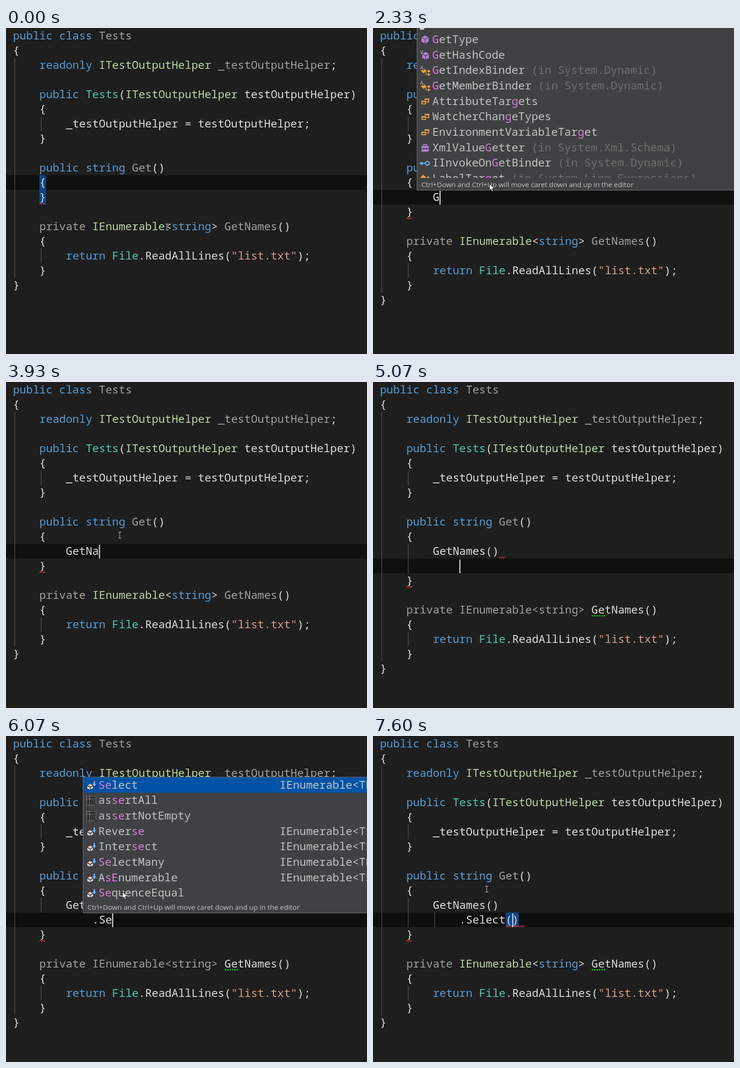
These frames come from a looping animation (787 px wide and 711 px high, 8 s). An HTML page with a canvas:

```html
<!DOCTYPE html>
<html lang="en">
<head>
<meta charset="utf-8">
<title>Code completion</title>
<style>
html, body { margin: 0; width: 100%; height: 100%; overflow: hidden; background: #1e1e1e; }
canvas { display: block; }
</style>
</head>
<body>
<canvas id="stage" width="787" height="711"></canvas>
<script>
const ctx = document.getElementById('stage').getContext('2d');
const W = 787, H = 711, LOOP = 8000;
const LEFT = 15.2, CHAR = 14.41, TOP = 1, LINE = 32, ROW = 33.65;
const MONO = '24px "Noto Sans Mono", monospace';
const BOLD = 'bold ' + MONO;
const sans = px => px + 'px "Open Sans", sans-serif';

// Colour keys used by the markup: each segment starts with its key
const INK = {
  k: '#569cd6', i: '#b8d7a3', c: '#4ec9b0', w: '#dcdcdc', g: '#a0a0a0', s: '#d69d85',
  t: '#c3c3c3', m: '#d57fd8', d: '#6e6e6e', v: '#cdbdf2', b: '#e6e6e6'
};
const PURPLE = '#b180d7', ORANGE = '#e8a24a', BLUE = '#6fbcff';
const PANEL = '#404143', BORDER = '#686868', DARK = '#2a2a2b';

const colX = col => LEFT + col * CHAR;
const rowY = row => TOP + row * LINE;

function rect(x, y, w, h, color) {
  ctx.fillStyle = color;
  ctx.fillRect(x, y, w, h);
}

function poly(points, fill, stroke, width = 1.2, close = true) {
  ctx.beginPath();
  points.forEach(([x, y]) => ctx.lineTo(x, y));
  if (close) ctx.closePath();
  if (fill) { ctx.fillStyle = fill; ctx.fill(); }
  if (stroke) { ctx.strokeStyle = stroke; ctx.lineWidth = width; ctx.stroke(); }
}

function write(markup, x, y, font = MONO) {
  ctx.font = font;
  for (const part of markup.split('`')) {
    const text = part.slice(1);
    ctx.fillStyle = INK[part[0]];
    ctx.fillText(text, x, y);
    x += font === MONO ? text.length * CHAR : ctx.measureText(text).width;
  }
}

// ---- editor ----

const HEAD = [
  [0, 'kpublic class `gTests'],
  [0, 'w{'],
  [4, 'kreadonly `iITestOutputHelper `g_testOutputHelper`w;'],
  [0, 'w'],
  [4, 'kpublic `cTests`w(`iITestOutputHelper `wtestOutputHelper)'],
  [4, 'w{'],
  [8, 'w_testOutputHelper = testOutputHelper;'],
  [4, 'w}'],
  [0, 'w'],
  [4, 'kpublic string `gGet`w()'],
  [4, 'w{']
];

function tail(used, grayType) {
  const type = grayType ? 'gIEnumerable<string> ' : 'iIEnumerable`w<`kstring`w> ';
  return [
    [4, 'w}'],
    [0, 'w'],
    [4, 'gprivate `' + type + '`' + (used ? 'w' : 'g') + 'GetNames`w()'],
    [4, 'w{'],
    [8, 'kreturn `cFile`w.ReadAllLines(`s"list.txt"`w);'],
    [4, 'w}'],
    [0, 'w}']
  ];
}

const guide = (col, from, to) =>
  rect(colX(col) + 3.2, rowY(from), 1.4, (to - from) * LINE, '#505050');

const match = (col, row) => rect(colX(col), rowY(row), CHAR, LINE, '#0e4583');

function squiggle(x, row, width) {
  const y = rowY(row) + 30, points = [];
  for (let d = 0; d <= width; d += 2.5) points.push([x + d, y + (d % 5 ? -1.6 : 1.6)]);
  poly(points, null, '#e0312d', 1.2, false);
}

// Latest value whose time has come
function at(t, steps) {
  let value = steps[0][1];
  for (const [time, v] of steps) if (t >= time) value = v;
  return value;
}

const FIRST = [[0, ''], [2270, 'G'], [2470, 'Ge'], [2600, 'Get'], [3200, 'GetN'],
  [3930, 'GetNa'], [4000, 'GetNames()']];
const SECOND = [[0, ''], [5670, '.'], [5800, '.S'], [6000, '.Se'], [7270, '.Select'], [7330, '.Select()']];

function drawEditor(t) {
  const body = t < 1200 ? 0 : t < 5000 ? 1 : 2;
  const first = at(t, FIRST), second = at(t, SECOND);
  const used = t >= 4130, end = 11 + body;
  const lines = HEAD.concat(
    [[8, 'w' + first], [12, 'w' + second]].slice(0, body),
    tail(used, used && t < 7400));

  const caretRow = 10 + body;
  let caretCol = [5, 8 + first.length, 12 + second.length][body];
  if (t >= 7330) caretCol--;

  rect(0, rowY(caretRow), W, LINE, '#0f0f0f');
  if (body === 0) { match(4, 10); match(4, 11); }
  if (t >= 4070 && t < 5000) { match(16, 11); match(17, 11); }
  if (t >= 7330) { match(19, 12); match(20, 12); }

  guide(0, 2, end + 6);
  guide(4, 6, 7);
  guide(4, end + 4, end + 5);
  if (t >= 4270) guide(4, 11, 12);
  if (t >= 5000 && t < 5400 || t >= 7600) guide(4, 12, 13);
  if (t >= 7600) guide(8, 12, 13);

  lines.forEach(([col, markup], row) => write(markup, colX(col), rowY(row) + 24));

  squiggle(colX(4), end, 14);
  if (t >= 4130 && t < 7270) squiggle(colX(18), 11, 14);
  if (t >= 7400) squiggle(colX(19) + 1, 12, 40);
  if (used) for (let n = 0; n < 6; n++) rect(477 + n * 5.2, rowY(end + 2) + 27.5, 2.8, 2.8, '#00e000');

  const hidden = t < 530 || t >= 7070 && t < 7270;
  if (!hidden) rect(colX(caretCol), rowY(caretRow) + 2, 2.5, 30, '#d0d0d0');
}

// ---- completion icons, drawn around (x, y) ----

function cube(x, y, r = 9.5) {
  const w = r * 0.9, h = r * 0.52;
  poly([[x, y - r], [x + w, y - h], [x + w, y + h], [x, y + r], [x - w, y + h], [x - w, y - h]], PURPLE, DARK, 1);
  poly([[x - w, y - h], [x, y], [x + w, y - h]], null, PANEL, 1.3, false);
  poly([[x, y], [x, y + r]], null, PANEL, 1.3, false);
}

function letter(ch, x, y) {
  ctx.font = sans(12);
  ctx.strokeStyle = DARK;
  ctx.lineWidth = 2.5;
  ctx.strokeText(ch, x - 11, y - 1.5);
  ctx.fillStyle = '#e0e0e0';
  ctx.fillText(ch, x - 11, y - 1.5);
}

function diamond(x, y, r) {
  poly([[x, y - r], [x + r, y], [x, y + r], [x - r, y]], ORANGE, DARK, 0.8);
}

function frame(x, y, w, h) {
  rect(x, y, w, h, ORANGE);
  rect(x + 2, y + 3, w - 4, h - 5, PANEL);
}

const ICONS = {
  method: (x, y) => cube(x, y),
  virtual(x, y) { cube(x + 1, y + 2, 9); letter('V', x, y); },
  abstract(x, y) { cube(x, y + 1.5, 9); letter('A', x, y); },
  locked(x, y) {
    cube(x, y);
    rect(x - 11, y + 6, 9, 6.5, '#d0d0d0');
    poly([[x - 9, y + 6], [x - 9, y + 3], [x - 4, y + 3], [x - 4, y + 6]], null, '#d0d0d0', 1.5, false);
  },
  type(x, y) {
    poly([[x - 3, y - 2], [x + 7, y - 2]], null, ORANGE, 1.6, false);
    poly([[x + 1, y - 2], [x + 1, y + 6], [x + 7, y + 6]], null, ORANGE, 1.6, false);
    diamond(x - 4, y - 2, 6.5);
    diamond(x + 7, y - 1, 4);
    diamond(x + 7, y + 6, 4);
  },
  abstractType(x, y) { ICONS.type(x + 1, y + 3); letter('A', x, y); },
  enumeration(x, y) {
    frame(x - 1, y - 6, 10, 9);
    rect(x - 9, y - 2, 12, 10, PANEL);
    frame(x - 8, y - 1, 10, 8);
  },
  delegate(x, y) {
    rect(x - 4, y - 7, 8, 2, PURPLE);
    rect(x - 4, y - 7, 2, 5, PURPLE);
    rect(x + 2, y - 7, 2, 5, PURPLE);
    rect(x - 8, y - 3, 16, 12, PURPLE);
    rect(x - 8, y + 2, 16, 1.4, PANEL);
    rect(x - 4, y + 1, 2.5, 3.5, PANEL);
    rect(x + 2, y + 1, 2.5, 3.5, PANEL);
  },
  contract(x, y) {
    rect(x - 8, y, 10, 2, BLUE);
    ctx.beginPath();
    ctx.arc(x - 8, y + 1, 3, 0, 7);
    ctx.fillStyle = BLUE;
    ctx.fill();
    ctx.beginPath();
    ctx.arc(x + 5, y + 1, 4.2, 0, 7);
    ctx.strokeStyle = BLUE;
    ctx.lineWidth = 2.2;
    ctx.stroke();
  },
  extension(x, y) {
    poly([[x - 9, y + 1], [x - 2, y - 3], [x + 5, y + 1], [x + 5, y + 7], [x - 2, y + 11], [x - 9, y + 8]],
      '#d2d2d2', DARK, 1);
    poly([[x - 9, y + 1], [x - 2, y + 5], [x + 5, y + 1]], null, DARK, 1.6, false);
    poly([[x - 2, y + 5], [x - 2, y + 11]], null, DARK, 1.2, false);
    poly([[x + 5, y - 9], [x + 9, y - 9], [x + 9, y - 3], [x + 12, y - 3], [x + 7, y + 4], [x + 2, y - 3], [x + 5, y - 3]],
      BLUE, DARK, 0.8);
  },
  template(x, y) {
    const dot = (a, b, color) => rect(x + a, y + b, 1.4, 1.4, color);
    rect(x - 11, y - 11, 23, 23, DARK);
    for (let n = -10; n <= 10; n += 10 / 3) {
      for (const edge of [-10, 10]) { dot(n, edge, '#e0e0e0'); dot(edge, n, '#e0e0e0'); }
      dot(n, -4, '#e0e0e0');
      dot(-4, n, '#e0e0e0');
    }
    for (let a = 0; a <= 7; a += 3.4) for (let b = 0; b <= 7; b += 3.4) dot(a, b, '#6c6c6c');
  }
};

// ---- completion popup ----

const item = (icon, name, note = '', type = '', bold = false) => ({ icon, name, note, type, bold });
const DYN = ' (in System.Dynamic)';
const SOURCE = 'IEnumerable<TSource>', RESULT = 'IEnumerable<TResult>';

const MEMBERS = [
  item('locked', 'Get'),
  item('method', 'GetType'),
  item('virtual', 'GetHashCode'),
  item('abstractType', 'GetIndexBinder', DYN),
  item('abstractType', 'GetMemberBinder', DYN),
  item('enumeration', 'AttributeTargets'),
  item('enumeration', 'WatcherChangeTypes'),
  item('enumeration', 'EnvironmentVariableTarget'),
  item('delegate', 'XmlValueGetter', ' (in System.Xml.Schema)'),
  item('contract', 'IInvokeOnGetBinder', DYN),
  item('type', 'LabelTarget', ' (in System.Linq.Expressions)')
];
const ONLY = [item('locked', 'GetNames')];
const AFTER_DOT = [
  item('extension', 'First'),
  item('extension', 'Where', '', SOURCE),
  item('extension', 'Select', '', RESULT),
  item('extension', 'ToArray', '', 'TSource[]'),
  item('template', 'cw'),
  item('template', 'assertAll'),
  item('template', 'assertNotEmpty'),
  item('abstract', 'GetEnumerator', '', 'IEnumerator<string>', true),
  item('virtual', 'Equals'),
  item('method', 'GetType'),
  item('virtual', 'ToString', '', 'string'),
  item('virtual', 'GetHashCode')
];
const FILTERED = [
  item('extension', 'Select', '', RESULT),
  item('template', 'assertAll'),
  item('template', 'assertNotEmpty'),
  item('extension', 'Reverse', '', SOURCE),
  item('extension', 'Intersect', '', SOURCE),
  item('extension', 'SelectMany', '', RESULT),
  item('extension', 'AsEnumerable', '', SOURCE),
  item('extension', 'SequenceEqual')
];

function highlight(name, query) {
  const from = query ? name.toLowerCase().indexOf(query.toLowerCase()) : -1;
  if (from < 0) return 't' + name;
  const to = from + query.length;
  return 't' + name.slice(0, from) + '`m' + name.slice(from, to) + '`t' + name.slice(to);
}

function drawPopup(x, bottom, list, { query = '', selected = -1, typeEnd = 0, top = -2, first }) {
  const floor = bottom - 27;
  rect(x - 1.5, top - 1, W, bottom - top + 1.5, BORDER);
  rect(x, top, W, bottom - top - 0.8, PANEL);
  ctx.save();
  ctx.beginPath();
  ctx.rect(x, top, W, floor - top);
  ctx.clip();
  list.forEach((it, n) => {
    const y = first + n * ROW;
    if (n === selected) rect(x, y - ROW / 2, W, ROW, '#0053a6');
    ICONS[it.icon](x + 16.5, y);
    if (it.bold) write('b' + it.name, x + 32.3, y + 8, BOLD);
    else write(highlight(it.name, query) + '`d' + it.note, x + 32.3, y + 8);
    if (it.type) write('t' + it.type, typeEnd - it.type.length * CHAR, y + 8);
  });
  ctx.restore();
  write('tCtrl+Down and Ctrl+Up will move caret down and up in the editor', x + 8.5, bottom - 7, sans(15.24));
}

function drawTooltip() {
  rect(-1, 89, 160, 189, BORDER);
  rect(-1, 90, 159, 100, '#585859');
  rect(-1, 190, 159, 87, PANEL);
  write('vTResult`t> selector):', 2, 111, sans(16.8));
  write('tint,`vTResult`t>', 1, 211, sans(16.8));
}

function drawCompletion(t) {
  if (t >= 2330 && t < 3270) {
    drawPopup(97, 354, MEMBERS, { query: at(t, FIRST).slice(0, 3), first: 25 - ROW });
  } else if (t >= 3270 && t < 3930) {
    drawPopup(97, 354, ONLY, { query: 'GetN', selected: t < 3400 ? -1 : 0, top: 293, first: 310 });
  } else if (t >= 5730 && t < 5870) {
    drawPopup(169, 386, AFTER_DOT, { selected: 0, typeEnd: 870.4, first: 23.4 - ROW });
  } else if (t >= 5870 && t < 7270) {
    drawPopup(169, 386, FILTERED,
      { query: t < 6070 ? 'S' : 'Se', selected: 0, typeEnd: 884.8, top: 90, first: 106.8 });
    if (t >= 6870) drawTooltip();
  } else return false;
  return true;
}

// ---- pointer ----

function beam(x, y) {
  for (const [color, width] of [['#1a1a1a', 3], ['#c8c8c8', 1.1]]) {
    poly([[x, y - 6], [x, y + 6]], null, color, width, false);
    for (const s of [-1, 1]) poly([[x - 3.5, y + 6.5 * s], [x + 3.5, y + 6.5 * s]], null, color, width, false);
  }
}

function arrow(x, y) {
  const shape = [[0, 0], [0, 14], [3.2, 11], [5.4, 16], [7.8, 15], [5.7, 10.2], [10, 10]];
  poly(shape.map(([a, b]) => [x + a, y + b]), '#fff', '#222', 1);
}

function drawPointer(t, overPopup) {
  if (overPopup) return arrow(254, 340);
  if (t >= 1200 && t < 3930 || t >= 5000 && t < 7270) return;
  const step = Math.floor(t * 15 / 1000 + 0.05) / 6;
  const p = Math.min(1, step), e = p * p * (3 - 2 * p);
  beam(351 - 103 * e, 434 - 100 * e);
}

function draw(t) {
  rect(0, 0, W, H, '#1e1e1e');
  drawEditor(t);
  drawPointer(t, drawCompletion(t));
}

function tick() {
  draw(performance.now() % LOOP);
  requestAnimationFrame(tick);
}
tick();
</script>
</body>
</html>
```
